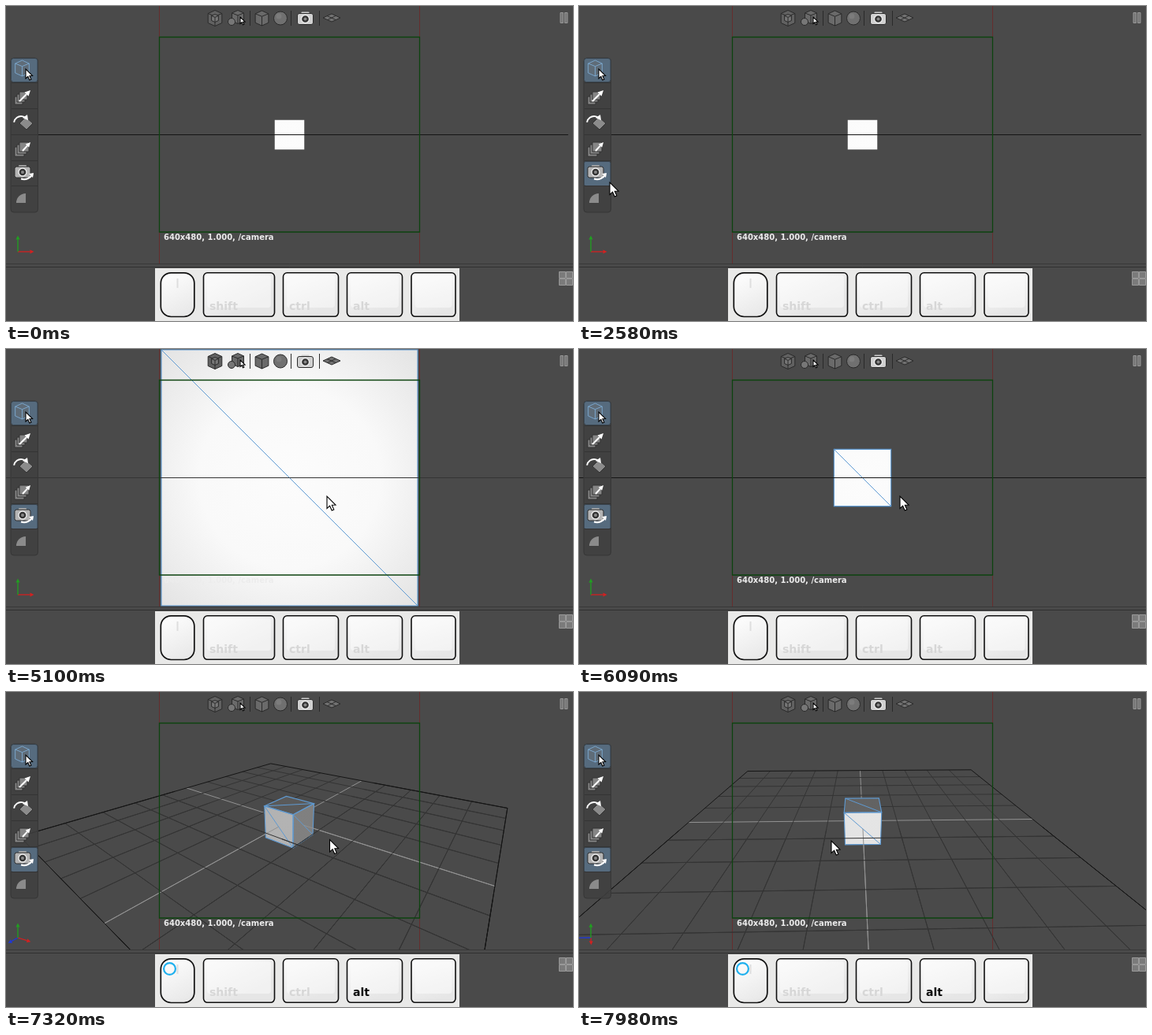
Animation, 719 px wide and 400 px high, one loop 8 s. Source, as an HTML page with a canvas:

```html
<!DOCTYPE html>
<html>
<head>
<meta charset="utf-8">
<style>
html, body { margin: 0; width: 100%; height: 100%; overflow: hidden; background: #4a4a4a; }
canvas { display: block; }
</style>
</head>
<body>
<canvas id="stage" width="719" height="400"></canvas>
<script>
const g = document.getElementById('stage').getContext('2d');
const LOOP = 8000, FOCAL = 360, CX = 359.5, CY = 163.5, RAD = Math.PI / 180;
const BLUE = '#5f9ad2', RING = '#1fb0ee';

// Keyed motion: [time, value, value...]
const cursorKeys = [
  [930, 316, 402], [1380, 179, 227], [1710, 38, 220], [1770, 38, 220], [1830, 39, 224],
  [2580, 39, 224], [3090, 376, 156], [3240, 376, 156], [3420, 374, 150], [3930, 374, 150],
  [4230, 407, 187], [6600, 407, 187], [6840, 474, 153], [6960, 474, 153], [7080, 462, 167],
  [7380, 397, 190], [7560, 358, 193], [7980, 320, 189]
];
const orbitKeys = [
  [6960, 0, 0], [7080, 7, 9.5], [7380, 45, 26.3], [7560, 67.3, 27.2], [7980, 88.8, 26.8]
];
const zoomTimes = [5700, 5880, 6090, 6360];

// Monotone cubic interpolation through the keys
function track(keys, t, c) {
  const last = keys.length - 1;
  if (t <= keys[0][0]) return keys[0][c];
  if (t >= keys[last][0]) return keys[last][c];
  const i = keys.findIndex(k => k[0] > t) - 1;
  const rate = j => (keys[j + 1][c] - keys[j][c]) / (keys[j + 1][0] - keys[j][0]);
  const slope = j => {
    if (j === 0 || j === last) return 0;
    const a = rate(j - 1), b = rate(j);
    return a * b <= 0 ? 0 : 2 * a * b / (a + b);
  };
  const h = keys[i + 1][0] - keys[i][0], u = (t - keys[i][0]) / h, v = 1 - u;
  return keys[i][c] * v * v * (1 + 2 * u) + keys[i + 1][c] * u * u * (3 - 2 * u)
    + h * u * v * (slope(i) * v - slope(i + 1) * u);
}

// ---- drawing helpers
function paint(fill, stroke, width = 1) {
  if (fill) { g.fillStyle = fill; g.fill(); }
  if (stroke) { g.strokeStyle = stroke; g.lineWidth = width; g.stroke(); }
}
function path(points, close) {
  g.beginPath();
  points.forEach(p => g.lineTo(p[0], p[1]));
  if (close) g.closePath();
}
function poly(points, fill, stroke, width) { path(points, true); paint(fill, stroke, width); }
function line(points, color, width) { path(points); paint(null, color, width); }
function box(x, y, w, h, r, fill, stroke, width) {
  g.beginPath(); g.roundRect(x, y, w, h, r); paint(fill, stroke, width);
}
function disc(x, y, r, fill, stroke, width) {
  g.beginPath(); g.arc(x, y, r, 0, 7); paint(fill, stroke, width);
}
function text(s, x, y, size, color) {
  g.font = `bold ${size}px "DejaVu Sans", sans-serif`;
  g.fillStyle = color;
  g.fillText(s, x, y);
}
function pointer(x, y, k = 1) {
  const shape = [[0, 0], [0, 15.5], [3.6, 12.2], [6.2, 18], [8.8, 16.9], [6.3, 11.2], [11, 11]];
  poly(shape.map(p => [x + p[0] * k, y + p[1] * k]), '#fff', '#000', 1.1);
}
function arrow(x, y, u, v, color, width, head) {
  const len = Math.hypot(u - x, v - y);
  if (len < 2) return;
  const a = (u - x) / len * head, b = (v - y) / len * head;
  line([[x, y], [u - a, v - b]], color, width);
  poly([[u, v], [u - a - b * .5, v - b + a * .5], [u - a + b * .5, v - b - a * .5]], color);
}

// ---- 3D view
const view = { yaw: 0, pitch: 0, dist: 10.1 };
function turn([x, y, z]) {
  const c = Math.cos(view.yaw), s = Math.sin(view.yaw);
  const p = Math.cos(view.pitch), q = Math.sin(view.pitch);
  const depth = x * s + z * c;
  return [x * c - z * s, y * p - depth * q, depth * p + y * q];
}
function project(point) {
  const [x, y, z] = turn(point), k = FOCAL / (view.dist - z);
  return [CX + x * k, CY - y * k];
}
function clip(seg, side) {
  if (!seg) return null;
  const [p, q] = seg, a = side(p), b = side(q);
  if (a < 0 && b < 0) return null;
  const cut = () => p.map((v, i) => v + (q[i] - v) * a / (a - b));
  return a < 0 ? [cut(), q] : b < 0 ? [p, cut()] : seg;
}
const inSight = p => view.dist - turn(p)[2] - .05;

function drawGrid(side) {
  for (const i of [0, 1, -1, 2, -2, 3, -3, 4, -4, 5, -5]) {
    const color = i === 0 ? '#929292' : Math.abs(i) === 5 ? '#151515' : '#343434';
    for (let seg of [[[i, 0, -5], [i, 0, 5]], [[-5, 0, i], [5, 0, i]]]) {
      seg = clip(seg, inSight);
      if (side) seg = clip(seg, side);
      if (seg) line(seg.map(project), color);
    }
  }
}

const faces = [0, 1, 2, 3].map(k => {
  const s = Math.round(Math.sin(k * Math.PI / 2)), c = Math.round(Math.cos(k * Math.PI / 2));
  const at = (r, y) => [(s + c * r) / 2, y, (c - s * r) / 2];
  return { n: [s, 0, c], pts: [at(-1, .5), at(1, .5), at(1, -.5), at(-1, -.5)] };
});
faces.push({ n: [0, 1, 0], pts: [[-.5, .5, .5], [-.5, .5, -.5], [.5, .5, -.5], [.5, .5, .5]] });

function drawCube(selected) {
  const shown = faces.map(f => ({ n: f.n, p: f.pts.map(project) })).filter(({ p }) =>
    (p[1][0] - p[0][0]) * (p[2][1] - p[0][1]) > (p[1][1] - p[0][1]) * (p[2][0] - p[0][0]));
  for (const { n, p } of shown) {
    const lit = Math.max(0, Math.min(.99, 1.15 * turn(n)[2] - .13)) * 255;
    const shade = g.createRadialGradient(CX, CY, 0, CX, CY, 230);
    [1, .985, .9].forEach((k, i) => shade.addColorStop(i / 2, `rgb(${lit * k},${lit * k},${lit * k})`));
    poly(p, shade);
  }
  if (selected) for (const { p } of shown) {
    poly(p, null, BLUE, 1.1);
    line([p[0], p[2]], BLUE);
  }
  // Grid parts lying in front of a visible side
  for (const { n } of shown)
    if (!n[1]) drawGrid(p => p[0] * n[0] + p[2] * n[2] - .5);
}

function drawAxes() {
  [[[1, 0, 0], '#d42020'], [[0, 0, 1], '#2038d8'], [[0, 1, 0], '#20a020']].forEach(([n, color]) => {
    const v = turn(n);
    arrow(15, 312, 15 + v[0] * 20.5, 312 - v[1] * 20.5, color, 1.3, 5);
  });
}

// ---- interface
function cubeIcon(x, y, r, fill, edge) {
  const w = r * .88, h = r * .6;
  poly([[x - w, y - h], [x, y - r], [x + w, y - h], [x + w, y + h], [x, y + r], [x - w, y + h]], fill, edge);
  line([[x - w, y - h], [x, y - h * .4], [x + w, y - h]], edge);
  line([[x, y - h * .4], [x, y + r]], edge);
}
function cameraIcon(x, y, body) {
  box(x - 5, y - 8, 10, 5, 1, body);
  box(x - 10, y - 6, 20, 14, 2.5, body, '#2c2c2c');
  disc(x, y + 1, 5, '#333', '#eee', 1.3);
  disc(x, y + 1, 2, '#888');
}
function topBar() {
  const dark = '#2a2a2a', mid = '#6a6a6a';
  cubeIcon(265, 15.5, 10, '#616161', dark);
  cubeIcon(265, 15.5, 5, '#777', dark);
  cubeIcon(294, 14, 8.5, mid, dark);
  disc(286, 20, 4.5, '#777', dark);
  pointer(297, 14, .55);
  cubeIcon(324.5, 15.5, 9.5, mid, dark);
  disc(348, 15.5, 8.5, '#707070', dark);
  disc(346, 13, 3.5, '#7c7c7c');
  cameraIcon(379.5, 15.5, '#d0d0d0');
  poly([[402, 15], [413, 10], [424, 15], [413, 20]], '#727272', dark);
  line([[407, 12.5], [418, 17.5]], dark);
  line([[408, 17.5], [418, 12.5]], dark);
  for (const x of [309.5, 361.5, 397.5]) line([[x, 6], [x, 25]], dark);
  for (const x of [703, 708.5]) box(x, 8.5, 3.5, 13, 0, '#777', '#969696');
}
function sideBar(t) {
  box(6, 66, 34.5, 196, 4, 'rgba(64,64,64,.85)', '#363636');
  const active = '#566b7e';
  box(6.5, 66.5, 33.5, 30, 3, active, '#39444e');
  if (t >= 1650) {
    const on = t >= 2100;
    box(6.5, 197.5, 33.5, 31, 2, on ? active : '#575757', on ? '#39444e' : '#3a3a3a');
  }
  for (const y of [97.5, 130.5, 163.5, 196.5, 228.5]) line([[7, y], [40, y]], '#343434');

  cubeIcon(20.5, 79, 10, '#5f6c78', '#7aa5ca');
  pointer(25, 80, .78);

  const stack = (y, s) => {
    for (let i = 0; i < 3; i++) box(11 + i * 3, y + 3 - i * 3, s, s, 0, '#858585', '#333');
  };
  stack(112, 10);
  arrow(17, 121, 31, 107, '#fff', 2, 7);

  poly([[17, 149], [25, 141], [34, 149], [26, 157]], '#8b8b8b', '#333');
  g.beginPath(); g.arc(19, 149, 9, 3.3, 5.3); paint(null, '#fff', 2);
  poly([[28, 145], [21, 142], [27, 138]], '#fff');

  stack(176, 12);
  arrow(21, 184, 31, 173, '#fff', 2, 6);

  cameraIcon(21, 210, '#b4b4b4');
  g.beginPath(); g.arc(23, 208, 12, .5, 1.9); paint(null, '#fff', 2.2);
  poly([[35, 212], [29, 213], [34, 218]], '#fff');

  path([[25, 250], [13, 250]]);
  g.arc(25, 250, 12, Math.PI, Math.PI * 1.5);
  g.closePath(); paint('#8b8b8b');
  line([[25.5, 238], [25.5, 250]], '#444');
}
function keyCap(x, w, label, on) {
  const shade = g.createLinearGradient(x, 338, x + w * .3, 395);
  shade.addColorStop(0, '#fdfdfd');
  shade.addColorStop(1, '#e6e6e6');
  box(x + .5, 338.8, w - 1, 55.5, 5, shade, '#101010', 1.6);
  box(x + 5, 342, w - 10, 41, 4, 'rgba(252,252,252,.55)');
  text(label, x + 8, 386, 14, on ? '#000' : '#d7d7d7');
}
function keyPanel(t) {
  g.fillStyle = '#e9e9e8';
  g.fillRect(189, 333, 386, 67);
  const shade = g.createLinearGradient(196, 338, 225, 395);
  shade.addColorStop(0, '#ffffff');
  shade.addColorStop(1, '#e8e8e8');
  box(196.3, 338.8, 42.5, 55.7, 13, shade, '#101010', 1.7);
  line([[217.5, 346], [217.5, 358]], '#dedede', 2);
  keyCap(250, 91, 'shift');
  keyCap(351, 71, 'ctrl');
  keyCap(432, 71, 'alt', t >= 6900);
  const hit = t >= 4590 && t < 5100;
  keyCap(513.5, 57, hit ? 'f' : '', hit);
  const pressed = (t >= 2100 && t < 2580) || (t >= 3240 && t < 3930) || t >= 6930;
  if (pressed) disc(207.5, 351.5, 7.4, null, RING, 2.2);
  if (t >= 5700 && t < 5730) disc(217.5, 356.5, 7.4, null, RING, 2.2);
}

function draw(t) {
  const zooms = zoomTimes.filter(z => t >= z).length;
  view.dist = t < 4620 ? 10.1 : 1.6077 * 1.505 ** zooms;
  view.yaw = track(orbitKeys, t, 1) * RAD;
  view.pitch = track(orbitKeys, t, 2) * RAD;

  g.fillStyle = '#4a4a4a';
  g.fillRect(0, 0, 719, 400);

  g.save();
  g.beginPath(); g.rect(0, 0, 719, 327); g.clip();
  for (const x of [194.5, 524.5]) line([[x, 0], [x, 327]], '#652d2d');
  drawGrid();
  drawCube(t >= 3300);
  box(194.5, 39.5, 330, 247.5, 0, null, '#0d430f', 1.3);
  text('640x480, 1.000, /camera', 200, 297, 10, '#ececec');
  drawAxes();
  topBar();
  sideBar(t);
  g.restore();

  line([[0, 327.5], [719, 327.5]], '#383838');
  line([[0, 331.5], [719, 331.5]], '#303030');
  for (const x of [701, 710]) for (const y of [337, 346]) box(x + .5, y + .5, 8, 8, 0, '#7b7b7b', '#999');

  keyPanel(t);
  if (t >= 930) pointer(track(cursorKeys, t, 1), track(cursorKeys, t, 2));
}

function tick() {
  draw(performance.now() % LOOP);
  requestAnimationFrame(tick);
}
tick();
</script>
</body>
</html>
```
